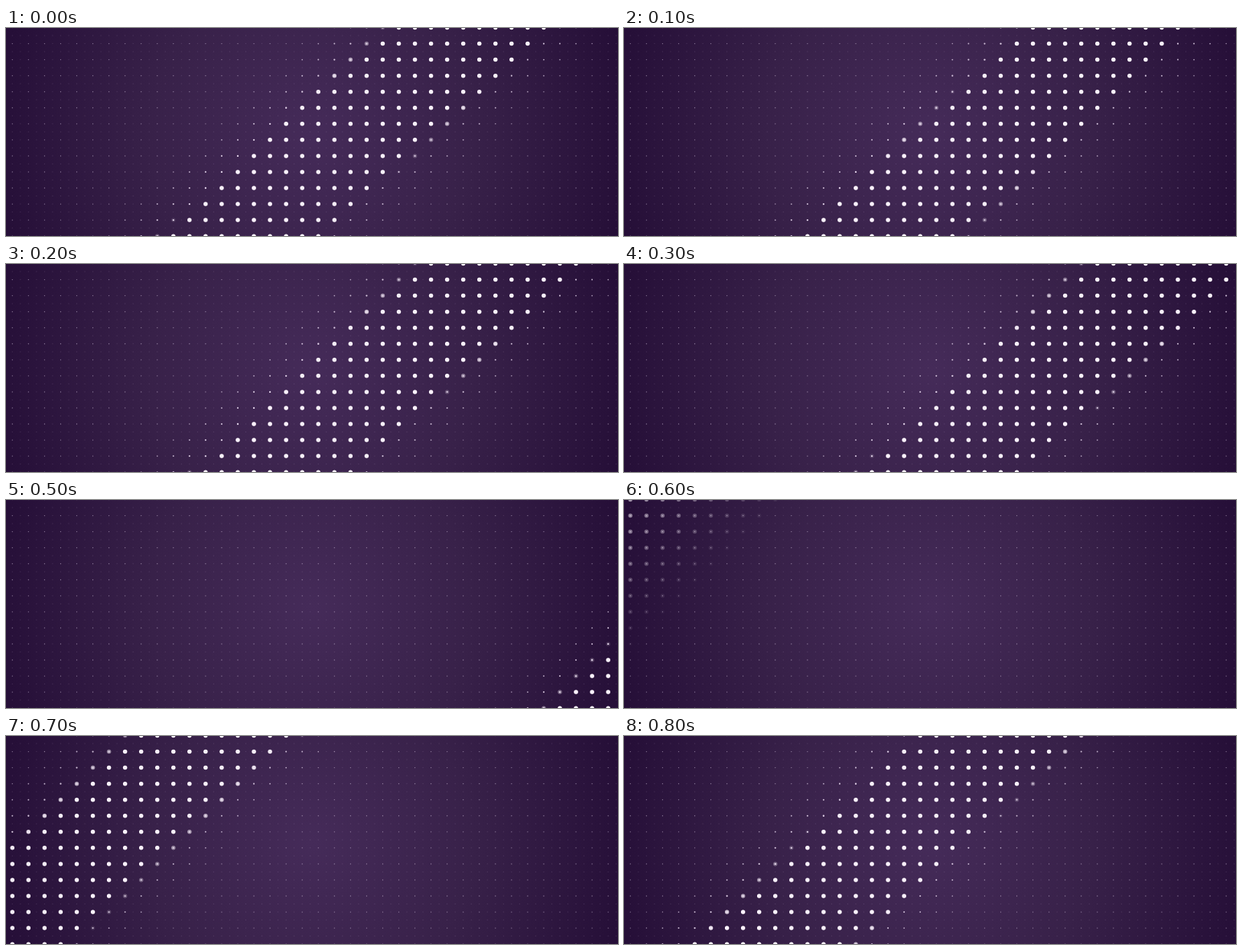
These frames come from a looping animation (800 px wide and 273 px high, 900 ms). An HTML page:

```html
<!DOCTYPE html>
<html lang="en">
<head>
<meta charset="utf-8">
<title>Dot wave</title>
<style>
  html, body { margin: 0; width: 100%; height: 100%; overflow: hidden; background: #250e37; }
  svg { display: block; width: 100%; height: 100%; }
</style>
</head>
<body>
<svg id="stage" viewBox="0 0 800 273" preserveAspectRatio="none">
  <defs>
    <radialGradient id="bg" gradientUnits="userSpaceOnUse" cx="400" cy="140" r="425">
      <stop offset="0" stop-color="#452b59"/>
      <stop offset=".5" stop-color="#382149"/>
      <stop offset="1" stop-color="#250e37"/>
    </radialGradient>
    <pattern id="fine" patternUnits="userSpaceOnUse" x="3.04" y="-5.76" width="10.525" height="10.525">
      <circle cx="5.26" cy="5.26" r=".6" fill="#d9c4e4" opacity=".17"/>
    </pattern>
  </defs>
  <rect width="800" height="273" fill="url(#bg)"/>
  <rect width="800" height="273" fill="url(#fine)"/>
  <g id="discs" fill="#fff8ff"></g>
  <g id="cores" fill="#f4e6fa"></g>
</svg>
<script>
const STEP = 100, GAP = 21.05, SLOPE = 1.08, TAIL = 100;

// Trailing edge of the wave and the softness of its sides, per step.
const WAVE = [
  [499, 9], [527, 8], [541, 8], [605, 10], [761, 16],
  [1010, 22], [-38, 400], [168, 22], [387, 12]
];

const clamp = v => Math.max(0, Math.min(1, v));

function circle(parent, x, y, r) {
  const c = document.createElementNS("http://www.w3.org/2000/svg", "circle");
  c.setAttribute("cx", x.toFixed(2));
  c.setAttribute("cy", y.toFixed(2));
  c.setAttribute("r", r);
  return parent.appendChild(c);
}

const discs = document.getElementById("discs");
const cores = document.getElementById("cores");
const dots = [];
for (let row = 0; row < 14; row++) {
  for (let col = 0; col < 38; col++) {
    const x = 8.3 + col * GAP, y = -0.5 + row * GAP;
    dots.push({
      s: x + SLOPE * y,
      disc: circle(discs, x, y, 2.75),
      core: circle(cores, x, y, 0.6)
    });
  }
}

function draw(step) {
  const [back, soft] = WAVE[step];
  const front = back + 218 - 0.9 * soft;
  const reach = Math.max(TAIL, soft);
  for (const { s, disc, core } of dots) {
    const fill = Math.min(clamp((s - back + soft) / soft), clamp((front + soft - s) / soft));
    const near = Math.min(clamp(1 - (back - s) / reach), 0.8 * clamp(1 - (s - front) / reach));
    disc.setAttribute("opacity", fill.toFixed(3));
    core.setAttribute("opacity", (0.42 + 0.55 * near).toFixed(3));
    core.setAttribute("r", (0.65 + 0.65 * near).toFixed(2));
  }
}

let shown = -1;
function tick() {
  const step = Math.floor(performance.now() / STEP) % WAVE.length;
  if (step !== shown) draw(shown = step);
  requestAnimationFrame(tick);
}
tick();
</script>
</body>
</html>
```
